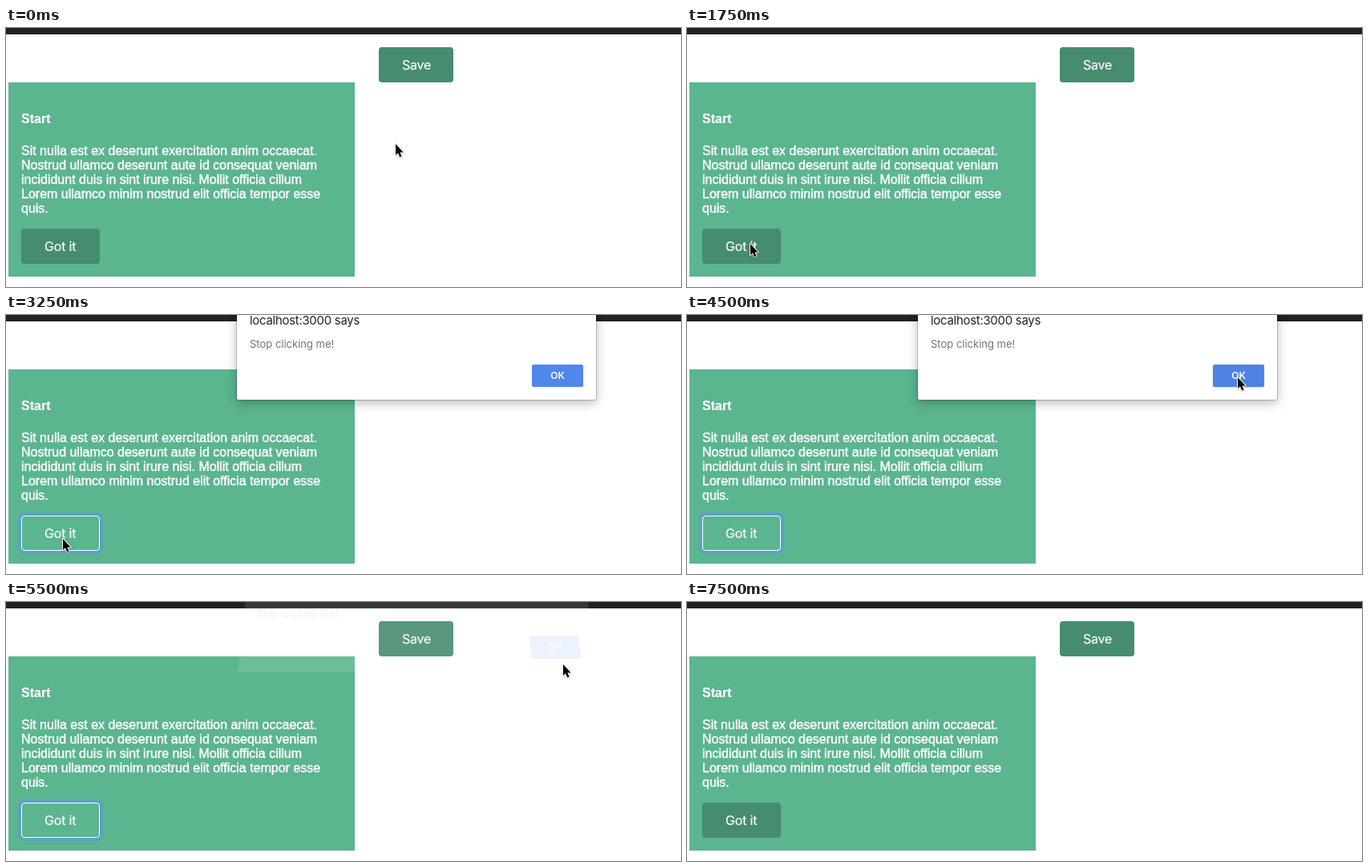
These frames come from a looping animation (842 by 324 pixels, 8000 ms). An HTML page with a canvas:

```html
<!DOCTYPE html>
<html lang="en">
<head>
<meta charset="utf-8">
<title>Button alert</title>
<style>
  html, body { margin: 0; width: 100%; height: 100%; overflow: hidden; background: #fff; }
  canvas { display: block; width: 842px; height: 324px; }
</style>
</head>
<body>
<canvas id="stage" width="842" height="324"></canvas>
<script>
const ctx = document.getElementById('stage').getContext('2d');
const LOOP = 8000, TICK = 250;
const PANEL = '#5bb58f', DARK = '#468c6e', BLUE = '#5186ec';
const BODY = '"Liberation Sans", Arial, sans-serif';
const UI = 'Inter, sans-serif';

const COPY = [
  'Sit nulla est ex deserunt exercitation anim occaecat.',
  'Nostrud ullamco deserunt aute id consequat veniam',
  'incididunt duis in sint irure nisi. Mollit officia cillum',
  'Lorem ullamco minim nostrud elit officia tempor esse',
  'quis.'
];

const PRESS = 2250, ALERT = 3250, HOVER = 4500, CLOSE = 5500, RELEASE = 5750, BLUR = 7000;

// Pointer waypoints, joined by straight moves
const PATH = [
  { at: 0, x: 485, y: 144 },
  { at: 250, x: 300, y: 214 },
  { at: 750, x: 74, y: 265 },
  { at: 1000, x: 95, y: 265 },
  { at: 1250, x: 80, y: 269 },
  { at: 2500, x: 74, y: 270 },
  { at: 2750, x: 70, y: 279 },
  { at: 3750, x: 70, y: 279 },
  { at: 4000, x: 540, y: 107 },
  { at: 4500, x: 686, y: 77 },
  { at: 5000, x: 694, y: 77 },
  { at: 6000, x: 694, y: 77 },
  { at: 6250, x: 719, y: -17 }
];

const within = (t, from, to) => t >= from && t < to;
const mix = (a, b, u) => Math.round(a + (b - a) * u);

function pointerAt(t) {
  const next = PATH.findIndex(p => p.at > t);
  if (next < 0) return PATH[PATH.length - 1];
  const a = PATH[next - 1], b = PATH[next];
  const u = (t - a.at) / (b.at - a.at);
  return { x: mix(a.x, b.x, u), y: mix(a.y, b.y, u) };
}

function box(x, y, w, h, r) {
  ctx.beginPath();
  ctx.roundRect(x, y, w, h, r);
}

// Trapezoid with level top and bottom edges
function trapezoid(top, topL, topR, bottom, botL, botR) {
  ctx.beginPath();
  ctx.moveTo(topL, top);
  ctx.lineTo(topR, top);
  ctx.lineTo(botR, bottom);
  ctx.lineTo(botL, bottom);
  ctx.closePath();
}

// weight adds a thin outline for heavier glyphs
function text(str, x, y, font, color, { spacing = 0, align = 'left', weight = 0 } = {}) {
  ctx.font = font;
  ctx.fillStyle = ctx.strokeStyle = color;
  ctx.textAlign = align;
  ctx.letterSpacing = spacing + 'px';
  ctx.fillText(str, x, y);
  if (!weight) return;
  ctx.lineWidth = weight;
  ctx.strokeText(str, x, y);
}

function shadow(alpha, blur, dy) {
  ctx.shadowColor = `rgba(0,0,0,${alpha})`;
  ctx.shadowBlur = blur;
  ctx.shadowOffsetY = dy;
}

function button(label, x, y, w, press = 0) {
  box(x, y, w, 44, 4);
  ctx.fillStyle = DARK;
  ctx.fill();
  ctx.globalAlpha = press;
  ctx.fillStyle = PANEL;
  ctx.fill();
  box(x + 0.5, y + 0.5, w - 1, 43, 3.5);
  ctx.strokeStyle = '#fff';
  ctx.lineWidth = 1;
  ctx.stroke();
  ctx.globalAlpha = 1;
  text(label, x + 29, y + 28, `16px ${UI}`, '#fff', { spacing: -0.2, weight: 0.2 });
}

function focusRing() {
  ctx.strokeStyle = 'rgba(91,155,212,0.45)';
  for (const width of [5, 7, 9]) {
    box(19, 251, 98, 44, 4);
    ctx.lineWidth = width;
    ctx.stroke();
  }
}

function page(t) {
  ctx.fillStyle = '#fff';
  ctx.fillRect(0, 0, 842, 324);
  ctx.fillStyle = '#242122';
  ctx.fillRect(0, 0, 842, 8);
  ctx.fillStyle = PANEL;
  ctx.fillRect(3, 68, 432, 243);
  text('Start', 19, 119, `bold 16px ${BODY}`, '#fff', { weight: 0.2 });
  COPY.forEach((line, i) => text(line, 19, 159 + 18 * i, `16px ${BODY}`, '#fff', { weight: 0.45 }));

  if (within(t, PRESS, BLUR)) focusRing();
  const press = within(t, PRESS, RELEASE) ? Math.min(1, (t - PRESS + TICK) / 500) : 0;
  button('Got it', 19, 251, 98, press);
  button('Save', 465, 24, 93);
}

function dialog(t) {
  ctx.save();
  shadow(0.28, 14, 4);
  box(288, -40, 448, 146, 2);
  ctx.fillStyle = '#fff';
  ctx.fill();
  ctx.restore();
  ctx.lineWidth = 1;
  ctx.strokeStyle = 'rgba(0,0,0,0.2)';
  box(287.5, -40, 449, 146.5, 2);
  ctx.stroke();

  text('localhost:3000 says', 304, 12, `15px ${UI}`, '#222', { spacing: -0.3 });
  text('Stop clicking me!', 304, 41, `13px ${UI}`, '#757575');

  const hover = t >= HOVER;
  ctx.save();
  if (hover) shadow(0.2, 2, 0.5);
  box(656, 62, 64, 28, 2);
  ctx.fillStyle = hover ? '#5082e3' : BLUE;
  ctx.fill();
  ctx.restore();
  text('OK', 688, 80, `600 12px ${UI}`, '#fff', { align: 'center' });
}

// The alert tilts back and fades as it closes
function closingDialog() {
  ctx.save();
  ctx.globalAlpha = 0.1;
  trapezoid(0, 299, 726, 88, 289, 737);
  ctx.fillStyle = '#fff';
  ctx.fill();
  trapezoid(42, 653, 714, 71, 656, 718);
  ctx.fillStyle = BLUE;
  ctx.fill();

  ctx.setTransform(1, 0, -0.11, 1, 312, 20);
  text('Stop clicking me!', 0, 0, `12.5px ${UI}`, '#757575');
  ctx.globalAlpha = 0.6;
  ctx.setTransform(1, 0, 0.1, 1, 685, 60);
  text('OK', 0, 0, `600 12px ${UI}`, '#fff', { align: 'center' });
  ctx.restore();
}

function pointer(t) {
  if (within(t, 500, 750) || t >= 6500) return;
  const { x, y } = pointerAt(t);
  ctx.save();
  ctx.translate(x + 1, y + 1);
  const arrow = new Path2D('M0 0V14L3 11.2L5.3 16.4L7.6 15.4L5.4 10.4H9.6Z');
  ctx.lineJoin = 'round';
  ctx.lineWidth = 2;
  ctx.strokeStyle = '#fff';
  shadow(0.35, 2, 0.5);
  ctx.stroke(arrow);
  shadow(0, 0, 0);
  ctx.fillStyle = '#000';
  ctx.fill(arrow);
  ctx.restore();
}

function draw(now) {
  const t = Math.floor((now % LOOP) / TICK) * TICK;
  page(t);
  if (within(t, ALERT, CLOSE)) dialog(t);
  if (within(t, CLOSE, RELEASE)) closingDialog();
  pointer(t);
}

const start = performance.now();
function tick() {
  draw(performance.now() - start);
  requestAnimationFrame(tick);
}
tick();
</script>
</body>
</html>
```
